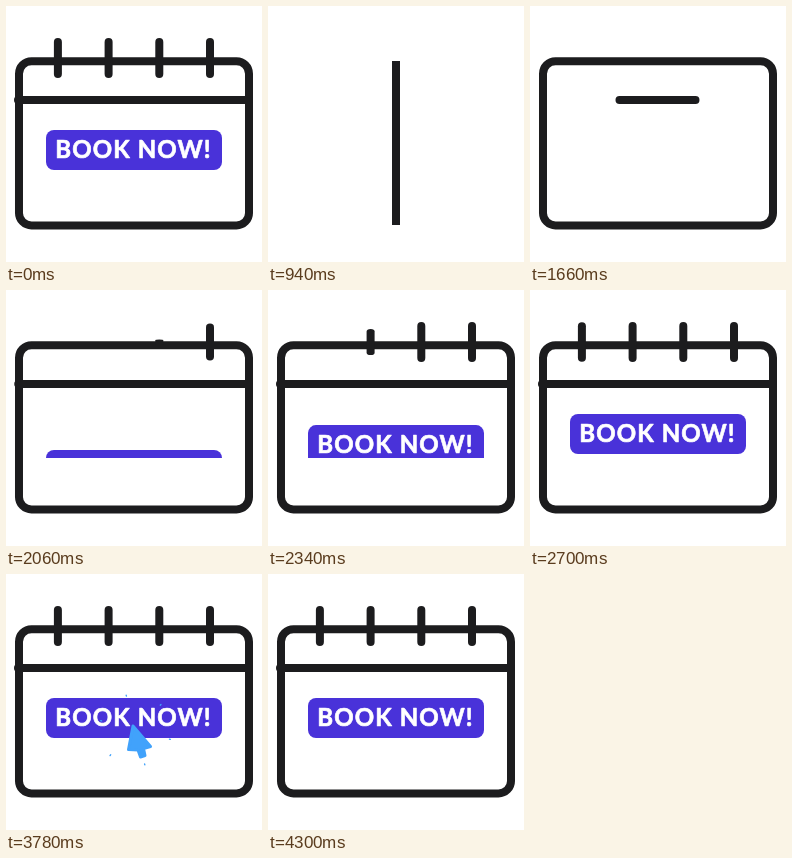
Recreate the animation shown at these times as an HTML page with a canvas. Size 256 px wide and 256 px high, loop 5 s.

```html
<!DOCTYPE html>
<html lang="en">
<head>
<meta charset="utf-8">
<title>Book now</title>
<style>
  html, body { margin: 0; width: 100%; height: 100%; overflow: hidden; background: #fff; }
  canvas { display: block; width: 256px; height: 256px; }
</style>
</head>
<body>
<canvas id="stage"></canvas>
<script>
const LOOP = 5000;
const INK = '#1c1c1e', VIOLET = '#4932d9', BLUE = '#41a2fb';
const canvas = document.getElementById('stage');
const ctx = canvas.getContext('2d');
const ratio = window.devicePixelRatio || 1;
canvas.width = canvas.height = 256 * ratio;

const progress = (t, start, length) => Math.min(1, Math.max(0, (t - start) / length));
const smooth = p => p * p * (3 - 2 * p);
const easeOut = p => 1 - (1 - p) ** 3;
const mix = (a, b, p) => a + (b - a) * p;

function roundRect(x, y, w, h, r) {
  ctx.beginPath();
  ctx.roundRect(x, y, w, h, r);
}

function drawBody(p) {
  const w = 230 * p;
  if (w < 0.5) {
    ctx.fillRect(124, 55, 8, 164);
    return;
  }
  roundRect(128 - w / 2, 55.2, w, 164.2, Math.min(12.5, w / 2));
  ctx.stroke();
}

function drawDivider(p) {
  const half = 115.5 * p;
  ctx.beginPath();
  ctx.moveTo(127.5 - half, 94);
  ctx.lineTo(127.5 + half, 94);
  ctx.stroke();
}

function drawPin(x, p) {
  ctx.save();
  ctx.translate(x, 52);
  ctx.scale(1, p);
  roundRect(-4, -20, 8, 40, 4);
  ctx.fill();
  ctx.restore();
}

function drawButton(y) {
  ctx.save();
  ctx.beginPath();
  ctx.rect(32, 112, 192, 56);
  ctx.clip();
  ctx.fillStyle = VIOLET;
  roundRect(40, y, 176, 40, 8);
  ctx.fill();
  ctx.font = '700 24px Lato, sans-serif';
  ctx.letterSpacing = '1.1px';
  ctx.textAlign = 'center';
  ctx.fillStyle = ctx.strokeStyle = '#fff';
  ctx.lineWidth = 0.7;
  ctx.fillText('BOOK NOW!', 127.5, y + 27.8);
  ctx.strokeText('BOOK NOW!', 127.5, y + 27.8);
  ctx.restore();
}

function drawCursor(y) {
  const points = [[127, 152], [144.5, 172.5], [137.5, 174.5], [139, 181.5], [134.5, 183], [132, 176], [122.5, 175.5]];
  ctx.save();
  ctx.translate(0, y);
  ctx.fillStyle = ctx.strokeStyle = BLUE;
  ctx.lineWidth = 3;
  ctx.beginPath();
  points.forEach(([px, py]) => ctx.lineTo(px, py));
  ctx.closePath();
  ctx.fill();
  ctx.stroke();
  ctx.restore();
}

function drawBurst(p) {
  if (p <= 0 || p >= 1) return;
  const radius = mix(8, 36, easeOut(p));
  const size = Math.min(1, 1.25 * (1 - p));
  ctx.fillStyle = BLUE;
  for (let i = 0; i < 6; i++) {
    ctx.save();
    ctx.translate(129.5, 156);
    ctx.rotate((i * 60 - 105) * Math.PI / 180);
    ctx.beginPath();
    ctx.ellipse(radius, 0, 3.8 * size, 2.4 * size, 0, 0, Math.PI * 2);
    ctx.fill();
    ctx.restore();
  }
}

function draw(t) {
  ctx.setTransform(ratio, 0, 0, ratio, 0, 0);
  ctx.fillStyle = '#fff';
  ctx.fillRect(0, 0, 256, 256);
  if (t >= 500 && t < 940) return;

  // The loop opens by holding the finished picture
  const time = t < 500 ? LOOP : t;
  ctx.fillStyle = ctx.strokeStyle = INK;
  ctx.lineWidth = 8;
  ctx.lineCap = ctx.lineJoin = 'round';

  drawBody(smooth(progress(time, 940, 680)));
  if (time >= 1400) drawDivider(smooth(progress(time, 1400, 680)));
  for (let i = 0; i < 4; i++) {
    const p = easeOut(progress(time, 1855 + i * 190, 355));
    if (p > 0) drawPin(204 - i * 50.7, p);
  }

  const rise = smooth(progress(time, 1870, 700));
  const press = smooth(progress(time, 3320, 100)) - smooth(progress(time, 3460, 200));
  if (rise > 0) drawButton(mix(168, 124, rise) + 3.3 * press);

  const arrive = smooth(progress(time, 2920, 460));
  const leave = progress(time, 3980, 310) ** 2;
  if (arrive > 0 && leave < 1) {
    drawBurst(progress(time, 3360, 560));
    drawCursor(mix(108, 0, arrive) + 108 * leave);
  }
}

const origin = performance.now();

function frame(now) {
  draw(Math.max(0, now - origin) % LOOP);
  requestAnimationFrame(frame);
}

draw(0);
requestAnimationFrame(frame);
</script>
</body>
</html>
```
